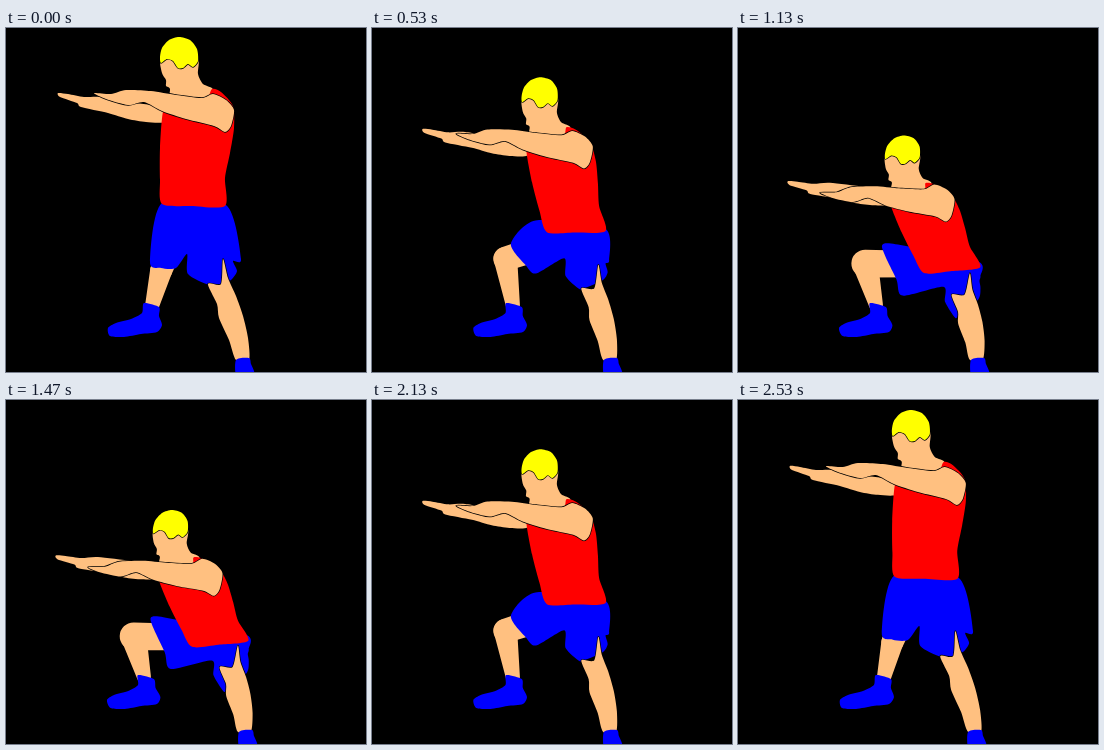
Animation of 360 by 344 pixels, one loop 2590 ms. Source, as an HTML page with a canvas:

```html
<!DOCTYPE html>
<html lang="en">
<head>
<meta charset="utf-8">
<title>Squat</title>
<style>
html, body { margin: 0; width: 100%; height: 100%; overflow: hidden; background: #000; }
canvas { display: block; }
</style>
</head>
<body>
<canvas id="stage" width="360" height="344"></canvas>
<script>
const ctx = document.getElementById('stage').getContext('2d');
const SKIN = '#ffc080', RED = '#f00', BLUE = '#00f', YELLOW = '#ff0';
const LOOP = 2590, STEP = 200 / 3, BOTTOM = 20, DELAY = 1.35;
const PIVOT = [190, 130];

// Standing outlines. dx and dy give the shift of the deepest squat
// as [at the pivot, change per x, change per y].
const farArm = {
  color: SKIN, dx: [-5, -.02, 0], dy: [84, -.06, 0],
  points: [52,65, 62,66, 78,69, 95,69, 130,75, 160,80, 158,94, 140,94, 122,91, 102,85, 75,79, 71,75, 54,69]
};
const nearArm = {
  color: SKIN, dx: [-10, -.04, 0], dy: [96, -.08, 0],
  points: [88,65, 105,66, 120,62, 145,63, 170,67, 196,70, 207,66, 220,72, 228,82, 225,98, 219,104,
    208,98, 180,91, 156,83, 138,74, 122,77, 100,71]
};
const head = {
  color: SKIN, dx: [-17, -.08, -.07], dy: [91, 0, -.1],
  points: [155,30, 156,45, 160,52, 160,58, 164,61, 164,78, 192,80, 207,62, 197,56, 192,46, 192,30, 175,20]
};
const hair = {
  ...head, color: YELLOW,
  points: [173,9, 163,12, 156,20, 154,29, 155,35, 161,31, 167,33, 172,40, 177,40, 182,36, 187,39, 192,33, 191,21, 184,12]
};
const shirt = {
  color: RED, dx: [9, -.12, .37], dy: [81, -.12, -.28],
  points: [157,84, 165,82, 199,72, 206,61, 215,64, 227,78, 228,100, 224,125, 219,150, 219,178, 185,178, 156,176, 154,152, 154,120]
};
const nearLeg = {
  color: SKIN, dx: [28, 0, -.13], dy: [30, 0, -.15],
  points: [217,231, 222,250, 230,268, 237,288, 242,310, 243,332, 230,332, 223,312, 213,290, 211,276, 202,256, 215,256]
};
const farShoe = {
  color: BLUE, dx: [-35, 0, .2], dy: [0, 0, 0],
  points: [138,275, 153,279, 153,288, 156,297, 151,304, 135,306, 118,309, 104,308, 102,300, 110,295, 125,291, 136,285]
};
const nearShoe = {
  color: BLUE, dx: [3, 0, 0], dy: [0, 0, 0],
  points: [230,332, 243,330, 245,336, 248,343, 248,350, 231,350]
};

// Cloth corners: standing x, y, deep x, y and how far the rising knee lifts them.
const shorts = [
  [156,175, 168,220, 0], [144,234, 145,219, 1], [155,240, 159,253, .6], [170,240, 165,270, .5],
  [181,226, 206,262, .8], [182,246, 208,277, .8], [203,257, 218,293, .8], [215,256, 222,290, .8],
  [225,252, 241,274, .7], [231,243, 243,262, .5], [227,233, 242,255, .5], [235,231, 243,250, .5],
  [220,177, 240,236, 0]
];

function squatDepth(step) {
  const s = Math.max(0, BOTTOM - DELAY - Math.abs(BOTTOM - step)) / (BOTTOM - DELAY);
  return Math.sin(Math.PI / 2 * s ** .82) ** 2;
}

// Sideways motion runs ahead of the drop.
const sideways = d => d * (2 - d);

function joint([x0, y0, x1, y1, lift], d) {
  const rise = lift * 4 * d * (1 - d);
  return [x0 + (x1 - x0) * sideways(d) - 6 * rise, y0 + (y1 - y0) * d - 13 * rise];
}

function pose({ points, dx, dy }, d) {
  const corners = [];
  for (let k = 0; k < points.length; k += 2) {
    const x = points[k], y = points[k + 1];
    const shift = ([c, kx, ky]) => c + kx * (x - PIVOT[0]) + ky * (y - PIVOT[1]);
    corners.push([x + shift(dx) * sideways(d), y + shift(dy) * d]);
  }
  return corners;
}

// Closed curve through all corners, slightly rounded.
function outline(corners) {
  const path = new Path2D(), n = corners.length, at = k => corners[(k + n) % n];
  const handle = (k, sign) => at(k).map((v, i) => v + sign * (at(k + 1)[i] - at(k - 1)[i]) / 8);
  path.moveTo(...at(0));
  for (let k = 0; k < n; k++) path.bezierCurveTo(...handle(k, 1), ...handle(k + 1, -1), ...at(k + 1));
  path.closePath();
  return path;
}

function capsule([x0, y0], r0, [x1, y1], r1) {
  const path = new Path2D(), a = Math.atan2(y1 - y0, x1 - x0), right = Math.PI / 2;
  path.arc(x0, y0, r0, a + right, a + 3 * right);
  path.arc(x1, y1, r1, a - right, a + right);
  path.closePath();
  return path;
}

function paint(color, ...paths) {
  ctx.fillStyle = color;
  if (color === SKIN || color === YELLOW) paths.forEach(path => ctx.stroke(path));
  paths.forEach(path => ctx.fill(path));
}

function drawFarLeg(d) {
  const hip = joint([172, 200, 190, 238, 0], d);
  const knee = joint([155, 243, 128, 237, .8], d);
  const ankle = joint([146, 278, 138, 277, 0], d);
  const bent = 11 + 3 * d;
  paint(SKIN, capsule(hip, 13, knee, bent), capsule(knee, bent - d, ankle, 7));
}

function draw(time) {
  const d = squatDepth(Math.floor((time % LOOP + 3.4) / STEP));
  const show = part => paint(part.color, outline(pose(part, d)));
  ctx.fillStyle = '#000';
  ctx.fillRect(0, 0, 360, 344);
  ctx.lineWidth = 1.4;
  show(farArm);
  drawFarLeg(d);
  paint(BLUE, outline(shorts.map(corner => joint(corner, d))));
  [nearLeg, farShoe, nearShoe, head, shirt, nearArm, hair].forEach(show);
}

const start = performance.now();
function tick() {
  draw(performance.now() - start);
  requestAnimationFrame(tick);
}
tick();
</script>
</body>
</html>
```
